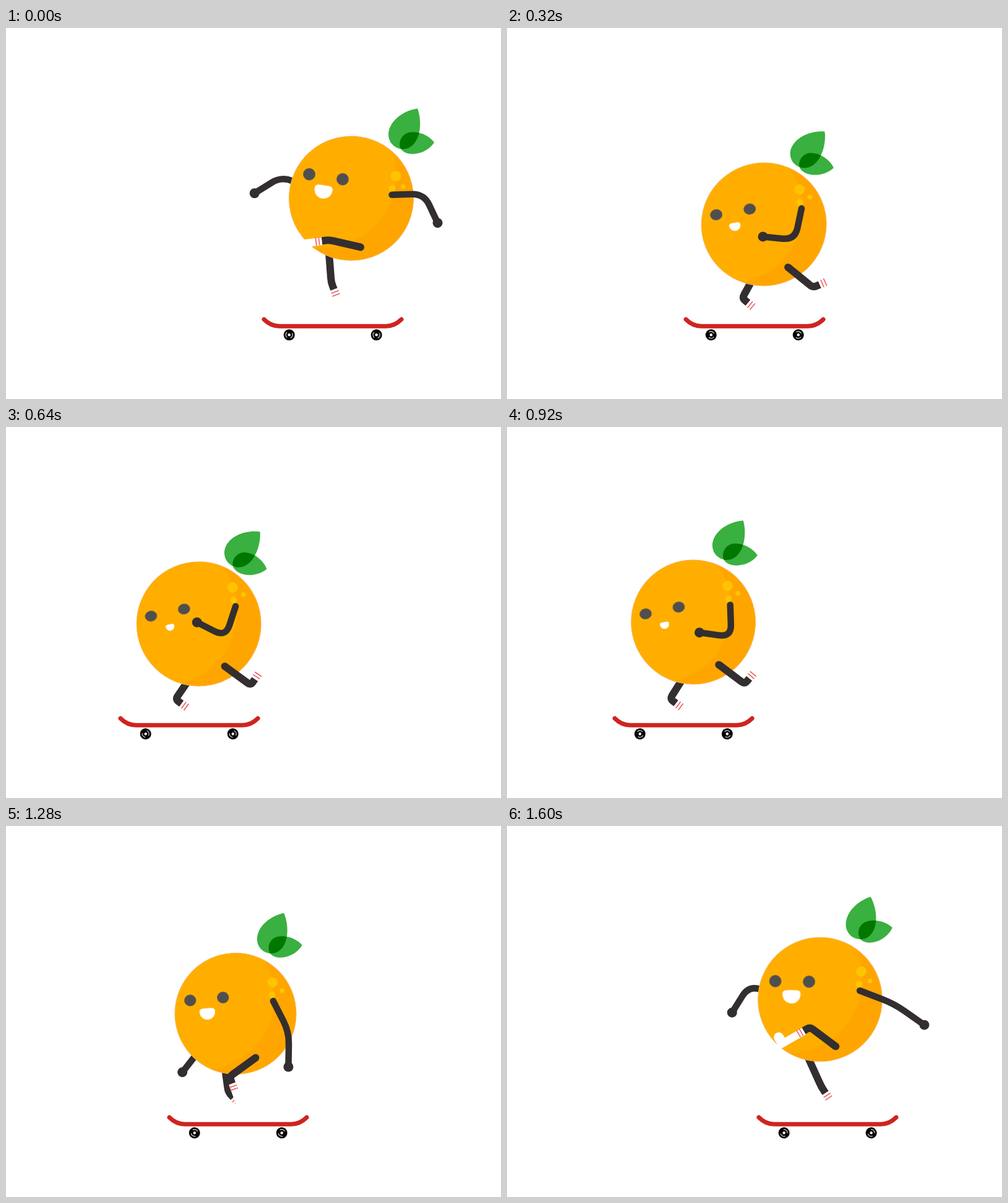
Write an HTML page that moves like this. It is 800 px wide and 600 px high and loops after 1.64 s.

```html
<!DOCTYPE html>
<html lang="en">
<head>
<meta charset="utf-8">
<title>Skating orange</title>
<style>
  html, body { margin: 0; width: 100%; height: 100%; overflow: hidden; background: #fff; }
  svg { display: block; width: 100vw; height: 100vh; }
  .limb { fill: none; stroke: #332e2f; stroke-linejoin: round; }
  .arm { stroke-width: 10.5; stroke-linecap: round; }
  .leg { stroke-width: 12; }
  .dark { fill: #332e2f; }
  .stripes { stroke: #ee5b60; stroke-width: 1.6; }
</style>
</head>
<body>
<svg viewBox="0 0 800 600">
  <defs>
    <clipPath id="round"><circle r="100.5"/></clipPath>
    <path id="big" d="M663 126C671 148 668 181 648 190C633 196 615 185 616 166C618 145 641 129 663 126Z"/>
    <path id="small" d="M690 181C683 171 665 161 648 165C637 168 632 180 635 189C641 205 675 203 690 181Z"/>
    <clipPath id="inBig"><use href="#big"/></clipPath>
    <path id="cuff" class="stripes" d="M4.5 -6.5V6.5M9.5 -6.5V6.5"/>
    <g id="wheel">
      <circle r="9" fill="#000"/>
      <path d="M-3.6 -4.2A5.5 5.5 0 0 0 -3.6 4.2M4.6 -3A5.5 5.5 0 0 1 2 5.1" fill="none" stroke="#bbb" stroke-width="1.4"/>
      <circle r="2.2" fill="#fff"/>
    </g>
  </defs>

  <path id="backArm" class="limb arm"/>
  <circle id="backHand" class="dark" r="8"/>
  <path id="backLeg" class="limb leg"/>
  <use id="backFoot" href="#cuff"/>

  <g id="body">
    <circle r="100.5" fill="#ffa500"/>
    <circle cx="-53" cy="-32" r="120" fill="#ffae00" clip-path="url(#round)"/>
    <circle r="100.5" fill="none" stroke="#f7b552"/>
    <g fill="#ffc400">
      <circle cx="65.8" cy="-46.4" r="8.3"/>
      <circle cx="63" cy="-25.7" r="5.5"/>
      <circle cx="80.2" cy="-31.4" r="3.8"/>
    </g>
    <g id="eyes" fill="#4f4f4f" stroke="#7a6440" stroke-width=".8">
      <ellipse cx="-73" cy="-28.4" rx="9.6"/>
      <ellipse cx="-18.4" cy="-28.5" rx="9.6"/>
    </g>
    <path id="mouth" fill="#fff" stroke="#fff0cc"
      d="M-14 -4C-14 -10 -8 -9.5 0 -9.5C8 -9.5 14 -10 14 -4C14 5 8 11 0 11C-8 11 -14 5 -14 -4Z"/>
    <g id="leaves">
      <g transform="translate(-640 -190)">
        <g fill="#39b040"><use href="#big"/><use href="#small"/></g>
        <use href="#small" fill="#007800" clip-path="url(#inBig)"/>
      </g>
    </g>
  </g>

  <path id="frontLeg" class="limb leg"/>
  <circle id="hip" class="dark" r="6"/>
  <g id="frontFoot">
    <path fill="#fff" d="M0 -7H42Q48 -7 48 -1V11A8 8 0 0 1 32 11V5.5H0Z"/>
    <use href="#cuff"/>
  </g>
  <path id="frontArm" class="limb arm"/>
  <circle id="frontHand" class="dark" r="8"/>

  <g id="board">
    <path d="M-111 -11C-104 -4 -96 0 -86 0H86C96 0 104 -4 111 -11" fill="none"
      stroke="#cf2420" stroke-width="7" stroke-linecap="round"/>
    <use class="wheel" href="#wheel"/>
    <use class="wheel" href="#wheel"/>
  </g>
</svg>
<script>
const LOOP = 1640, STEP = 40, RAD = Math.PI / 180;
const el = id => document.getElementById(id);
const set = (node, attrs) => { for (const k in attrs) node.setAttribute(k, attrs[k]); };
const polar = ([x, y], a, r) => [x + r * Math.cos(a * RAD), y + r * Math.sin(a * RAD)];
const bump = (t, mid, width) => Math.exp(-(((t - mid) / width) ** 2));

// Monotone cubic curve through [time, value] points
function curve(...pts) {
  const last = pts.length - 1;
  const slope = i => (pts[i + 1][1] - pts[i][1]) / (pts[i + 1][0] - pts[i][0]);
  const tangent = i => {
    if (i === 0) return slope(0);
    if (i === last) return slope(last - 1);
    const a = slope(i - 1), b = slope(i);
    return a * b > 0 ? 2 * a * b / (a + b) : 0;
  };
  return t => {
    let i = 0;
    while (i < last - 1 && t >= pts[i + 1][0]) i++;
    const [t0, v0] = pts[i], [t1, v1] = pts[i + 1];
    const h = t1 - t0, s = (t - t0) / h, r = 1 - s;
    return v0 * (1 + 2 * s) * r * r + v1 * s * s * (3 - 2 * s)
      + h * s * r * (tangent(i) * r - tangent(i + 1) * s);
  };
}

const boardX = curve([0, 528], [200, 459], [480, 328], [640, 296], [860, 283], [1120, 313], [1280, 375], [1600, 518]);
const lead = curve([0, 30], [40, 48], [200, 15], [920, 16], [1280, -4], [1600, -12]);
const bodyY = curve([0, 275.5], [200, 316.5], [600, 318.5], [920, 315.5], [1280, 303.5], [1600, 280.5]);
const lean = curve([0, 8.6], [200, -5.7], [480, -12.1], [920, -11.5], [1280, -5], [1600, 1]);
const leafTurn = curve([0, 0], [200, 10], [640, 16], [920, 4], [1600, -9]);

// Angles of the upper and lower part of each limb
const frontArm = [
  curve([0, -2], [200, 91], [480, 108], [640, 108], [920, 88], [1280, 63], [1600, 21]),
  curve([0, 65], [200, 155], [480, 207], [640, 207], [920, 188], [1280, 91], [1600, 35])];
const backArm = [
  curve([0, 205], [200, 90], [1280, 78], [1600, 200]),
  curve([0, 148], [200, 20], [920, 10], [1280, 128], [1600, 122])];
const frontLeg = [
  curve([0, 193], [200, 45], [480, 36], [920, 37], [1280, 144], [1600, 217]),
  curve([0, 173], [200, 25], [480, -57], [920, -50], [1280, 70], [1600, 150])];

// Two-part limb with a rounded joint
function limb(id, from, joint, end, upper, lower, bend) {
  const a = polar(joint, upper, -bend), b = polar(joint, lower, bend);
  set(el(id), { d: `M${from}L${a}Q${joint} ${b}L${end}` });
}

// An arm reaches further as it straightens
function arm(side, from, angles, t) {
  const [upper, lower] = angles.map(f => f(t));
  const size = 52 + 9 * Math.cos((lower - upper) * RAD) ** 6;
  const elbow = polar(from, upper, size), hand = polar(elbow, lower, size);
  limb(side + 'Arm', from, elbow, hand, upper, lower, 20);
  set(el(side + 'Hand'), { cx: hand[0], cy: hand[1] });
}

function leg(side, hip, knee, ankle, upper, lower) {
  limb(side + 'Leg', hip, knee, ankle, upper, lower, 6);
  set(el(side + 'Foot'), { transform: `translate(${ankle}) rotate(${lower})` });
}

const wheels = document.querySelectorAll('.wheel');
const eyes = el('eyes').children;

function draw(t) {
  const bx = boardX(t), x = bx + lead(t), y = bodyY(t), tilt = lean(t);
  const squash = bump(t, 200, 90), size = 1 - .025 * bump(t, 1280, 200);
  const sx = size + .03 * squash, sy = size - .065 * squash;
  const c = Math.cos(tilt * RAD), s = Math.sin(tilt * RAD);
  const onBody = (px, py) => [
    x + px * sx * c - py * sy * s,
    y + px * sx * s + py * sy * c];

  set(el('body'), { transform: `translate(${x} ${y}) rotate(${tilt}) scale(${sx} ${sy})` });

  // leaning forward narrows the eyes and closes the mouth
  const squint = Math.max(0, (-3 - tilt) / 9);
  set(el('mouth'), { transform: `translate(-46.4 -4.3) scale(${1.02 - .53 * squint})` });
  for (const e of eyes) set(e, { ry: 9.6 - 1.2 * squint });

  const turn = leafTurn(t);
  set(el('leaves'), {
    transform: `translate(${71 + .4 * turn} ${-93 + .85 * turn}) rotate(${turn - tilt})`
  });

  arm('back', onBody(-66, -4), backArm, t);
  arm('front', onBody(64, -15.4), frontArm, t);

  const hip = onBody(26.7, 75.8), [upper, lower] = frontLeg.map(f => f(t));
  const knee = polar(hip, upper, 52);
  leg('front', hip, knee, polar(knee, lower, 12), upper, lower);
  set(el('hip'), { cx: hip[0], cy: hip[1] });

  // the back foot stays on the board and the knee follows it
  const backHip = onBody(-26, 77), shin = 55 + 1.6 * tilt;
  const ankle = [bx - 4 + .7 * tilt, 433 - 1.2 * tilt];
  const backKnee = polar(ankle, shin, -12);
  const thigh = Math.atan2(backKnee[1] - backHip[1], backKnee[0] - backHip[0]) / RAD;
  leg('back', backHip, backKnee, ankle, thigh, shin);

  set(el('board'), { transform: `translate(${bx} 482.3)` });
  wheels.forEach((w, i) => set(w, {
    transform: `translate(${i ? 70.7 : -70.3} 14) rotate(${(bx - 528) / 9 / RAD})`
  }));
}

function tick() {
  draw(Math.floor(performance.now() % LOOP / STEP) * STEP);
  requestAnimationFrame(tick);
}
tick();
</script>
</body>
</html>
```
